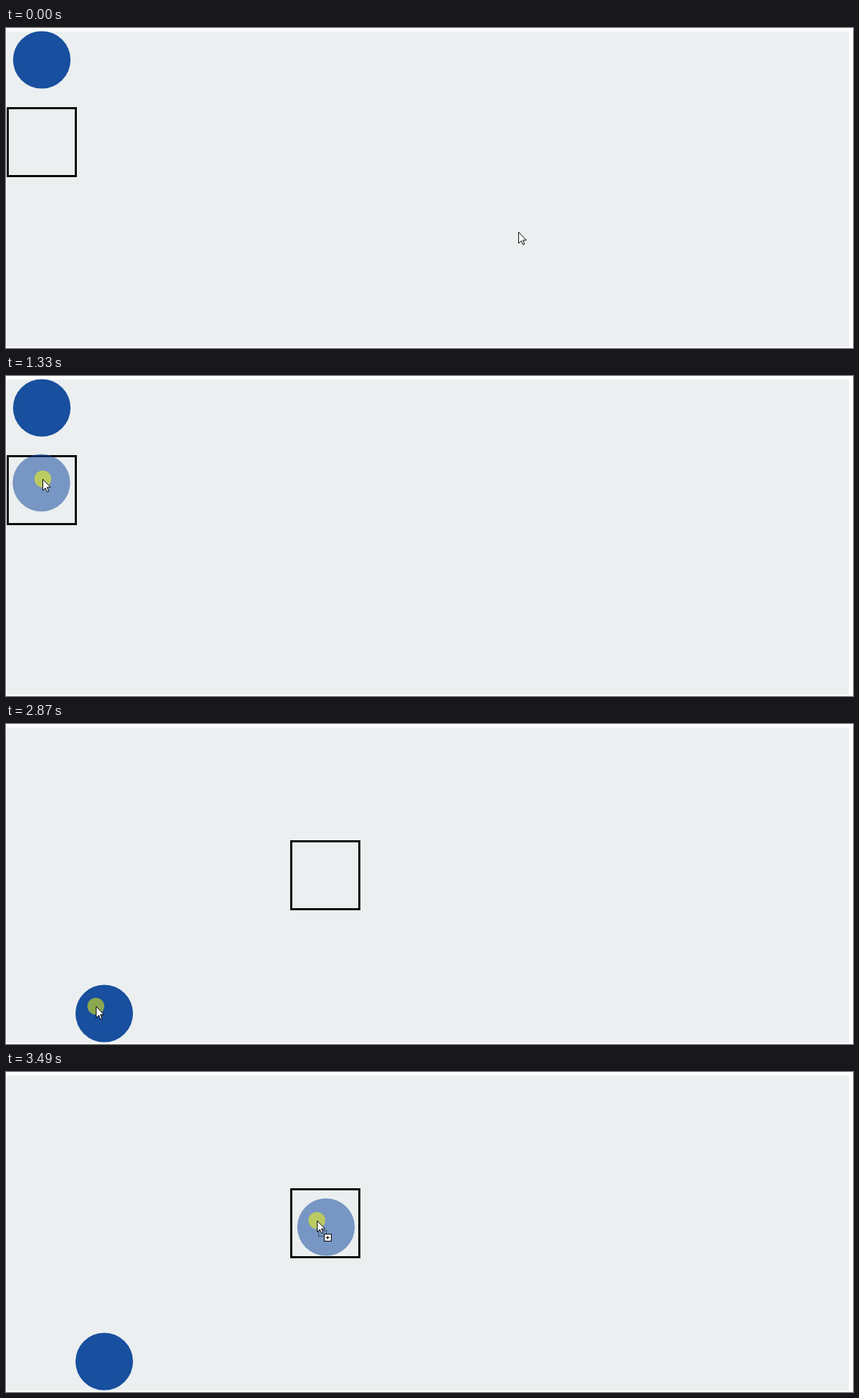
Recreate the animation shown at these times as an HTML page with a canvas. Size 1207 px wide and 457 px high, loop 3.69 s.

```html
<!DOCTYPE html>
<html lang="en">
<head>
<meta charset="utf-8">
<title>Drag and drop</title>
<style>
html, body { margin: 0; width: 100%; height: 100%; overflow: hidden; background: #fff; }
canvas { display: block; }
</style>
</head>
<body>
<canvas id="stage" width="1207" height="457"></canvas>
<script>
const ctx = document.getElementById('stage').getContext('2d');
const LOOP = 3690, BLUE = '#184f9e', RADIUS = 41;

// Bursts of screen updates: start, end, number of updates
const bursts = [
  [0, 530, 9], [600, 1060, 8], [1130, 1760, 10], [2140, 2600, 8],
  [2680, 2870, 4], [2940, 3160, 4], [3230, 3490, 5]
];

const smooth = u => u * u * (3 - 2 * u);
const linear = u => u;
const easeOut = u => 1 - (1 - u) * (1 - u);
const hold = u => u < 1 ? 0 : 1;

// Keys: time, x, y, easing used to arrive there
const pointer = [
  [0, 730, 291], [530, 55, 52], [670, 53, 44], [800, 53, 44], [1060, 50, 102],
  [1130, 50, 122], [1620, 55, 173, easeOut], [1690, 55, 174], [1760, 53, 186],
  [2140, 54, 186, hold], [2600, 116, 394], [2810, 128, 403], [2870, 128, 403],
  [3160, 353, 281, linear], [3230, 395, 258, linear], [3490, 443, 212, easeOut]
];
const firstGhost = [[1130, 48, 131], [1620, 53, 175, easeOut], [1690, 53, 175.5]];
const secondGhost = [
  [2940, 150, 408], [3160, 334, 309, linear],
  [3230, 392, 277.5, linear], [3490, 456, 221.5, easeOut]
];

function snap(t) {
  const [start, end, n] = bursts.filter(b => b[0] <= t + 2).pop();
  const step = (end - start) / (n - 1);
  return Math.min(end, start + Math.floor((t - start + 2) / step) * step);
}

function at(keys, t) {
  const i = keys.findIndex(k => k[0] > t + 0.01);
  if (i < 0) return keys[keys.length - 1].slice(1, 3);
  if (i === 0) return keys[0].slice(1, 3);
  const a = keys[i - 1], b = keys[i];
  const u = (b[3] || smooth)((t - a[0]) / (b[0] - a[0]));
  return [a[1] + (b[1] - a[1]) * u, a[2] + (b[2] - a[2]) * u];
}

const between = (t, a, b) => t > a - 1 && t < b - 1;

function disc(x, y, r, color, alpha = 1) {
  ctx.globalAlpha = alpha;
  ctx.fillStyle = color;
  ctx.beginPath();
  ctx.arc(x, y, r, 0, 2 * Math.PI);
  ctx.fill();
  ctx.globalAlpha = 1;
}

const arrow = new Path2D('M.5 .5V16.5L4.2 13L6.7 18.5L9 17.5L6.5 12H11.5Z');

function drawPointer(x, y, copying) {
  ctx.save();
  ctx.translate(Math.round(x), Math.round(y));
  ctx.lineWidth = 1;
  ctx.strokeStyle = '#000';
  ctx.fillStyle = '#fff';
  if (copying) {
    ctx.setLineDash([1, 1]);
    ctx.strokeRect(2.5, 14.5, 11, 8);
    ctx.setLineDash([]);
    ctx.fillRect(10, 19, 11, 11);
    ctx.strokeRect(10.5, 19.5, 10, 10);
    ctx.fillStyle = '#000';
    ctx.fillRect(13, 24, 5, 1);
    ctx.fillRect(15, 22, 1, 5);
    ctx.fillStyle = '#fff';
  }
  ctx.fill(arrow);
  ctx.stroke(arrow);
  ctx.restore();
}

function draw(t) {
  const dropped = t > 1759;
  const dragging = t > 2939;
  ctx.fillStyle = '#fff';
  ctx.fillRect(0, 0, 1207, 457);
  ctx.fillStyle = '#ebeff0';
  ctx.fillRect(1, 5, 1200, 450);

  const [bx, by] = dropped ? [405, 166] : [1, 113];
  ctx.strokeStyle = '#000';
  ctx.lineWidth = 3;
  ctx.strokeRect(bx + 1.5, by + 1.5, 97, 97);

  const [lx, ly] = dropped ? [140, 413.5] : [51, 45.5];
  disc(lx, ly, RADIUS, BLUE);

  if (between(t, 1130, 1760)) disc(...at(firstGhost, t), RADIUS, BLUE, 0.55);
  if (dragging) disc(...at(secondGhost, t), RADIUS, BLUE, 0.55);

  const [x, y] = at(pointer, t);
  if (between(t, 730, 2140) || t > 2869) disc(x, y, 12, '#ff0', 0.5);
  drawPointer(x, y, dragging);
}

const begin = performance.now();
function tick() {
  draw(snap((performance.now() - begin) % LOOP));
  requestAnimationFrame(tick);
}
tick();
</script>
</body>
</html>
```
